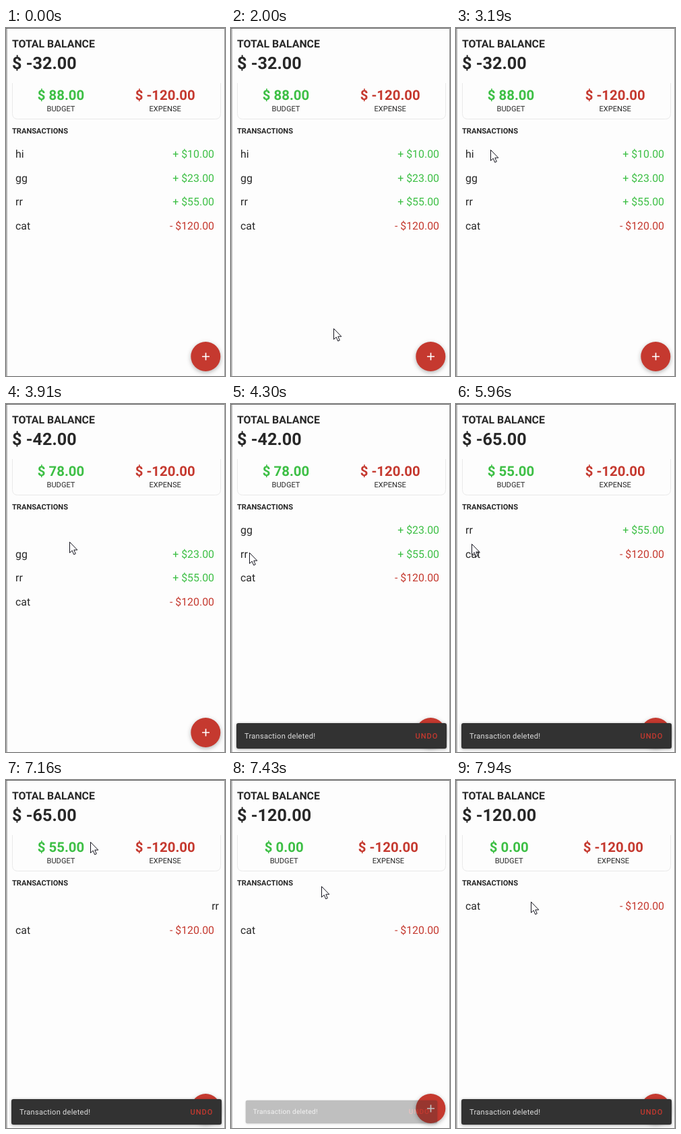
Animation of 325 by 518 pixels, one loop 8 s. Source, as an HTML page:

```html
<!DOCTYPE html>
<html lang="en">
<head>
<meta charset="utf-8">
<title>Budget list</title>
<style>
  html, body { margin: 0; width: 100%; height: 100%; overflow: hidden; background: #fdfdfd; }
  svg { display: block; width: 325px; height: 518px; font-family: Roboto, Arial, sans-serif; }
  text { fill: #282828; white-space: pre; text-rendering: geometricPrecision; }
  .bold { font-weight: 700; }
  .mid { text-anchor: middle; }
  .end { text-anchor: end; }
  .small { font-size: 11.1px; }
  .item { font-size: 15.9px; }
  .head { font-size: 15.9px; }
  .total { font-size: 25.2px; }
  .sum { font-size: 20.4px; }
  .green { fill: #3dbf45; }
  .red { fill: #c5392f; }
  .pale { fill: #dedede; }
  .fab { filter: drop-shadow(0 2px 3px rgba(0, 0, 0, .3)); }
  .bar { filter: drop-shadow(0 1px 2px rgba(0, 0, 0, .35)); }
</style>
</head>
<body>
<svg viewBox="0 0 325 518">
  <rect width="325" height="518" fill="#fdfdfd"/>
  <text class="bold head" x="9" y="29.4">TOTAL BALANCE</text>
  <text class="bold total" id="total" x="9" y="60.7"></text>

  <path d="M9.5 82V127.5Q9.5 135.5 17.5 135.5H310.5Q318.5 135.5 318.5 127.5V82"
        fill="none" stroke="#e9e9e9"/>
  <g id="sums">
    <text class="bold sum mid green" id="budget" x="81.5" y="106.7"></text>
    <text class="small mid" x="81.5" y="124.3">BUDGET</text>
    <text class="bold sum mid red" id="expense" x="236.2" y="106.7"></text>
    <text class="small mid" x="236.2" y="124.3">EXPENSE</text>
  </g>

  <text class="bold small" x="9" y="157.2">TRANSACTIONS</text>
  <g id="list"></g>

  <g class="fab">
    <circle cx="296.3" cy="489" r="22" fill="#c5392f"/>
    <path d="M291 489H302M296.5 483.5V494.5" stroke="#fff" stroke-width="1.7"/>
  </g>

  <g id="snack">
    <rect class="bar" x="8" y="475" width="312" height="38" rx="3" fill="#323232"/>
    <text class="small pale" x="20" y="497.7" letter-spacing=".25">Transaction deleted!</text>
    <text class="small red" x="273.5" y="497.8" letter-spacing="1" font-weight="500">UNDO</text>
  </g>

  <path d="M0 .5H325M1 0V518" stroke="#666"/>
  <path d="M324.5 0V518" stroke="#999"/>
  <path id="cursor" d="M.5 .5V16.5L4.2 13.1L6.7 19L9.3 17.9L6.8 12.2H11.8Z"
        fill="#fff" stroke="#15151f" stroke-linejoin="round"/>
</svg>
<script>
const LOOP = 8000, STEP = 130, FIRST_Y = 193, PITCH = 35.5;
const FADE_OUT = 75, FADE_IN = 150, MOVE_WAIT = 145, MOVE = 250;

// The screen refreshes in bursts; the pointer follows each path at an even pace.
const bursts = [
  { at: 120, steps: 8, path: [[289, 511], [259, 497], [276, 493]] },
  { at: 1580, steps: 4, path: [[245, 482], [152, 447]] },
  { at: 2410, steps: 8, path: [[145, 412], [123, 162], [22, 189]] },
  { at: 3490, steps: 8, path: [[30, 187], [118, 190], [34, 242], [22, 205]] },
  { at: 4620, steps: 8, path: [[30, 194], [116, 204], [16, 223]] },
  { at: 5720, steps: 8, path: [[24, 215], [20, 192], [64, 168]] },
  { at: 6770, steps: 10, path: [[80, 150], [125, 92], [138, 191], [111, 181]] }
];

const rows = [
  { name: "hi", value: 10, swipe: 3300, length: 500 },
  { name: "gg", value: 23, swipe: 4560, length: 500 },
  { name: "rr", value: 55, swipe: 6240, length: 1000 },
  { name: "cat", value: -120, swipe: Infinity, length: 0 }
];

const $ = id => document.getElementById(id);
const clamp = v => Math.max(0, Math.min(1, v));
const ease = v => (1 - Math.cos(Math.PI * clamp(v))) / 2;
const money = v => "$ " + v.toFixed(2);

function make(tag, parent, attrs, content = "") {
  const el = document.createElementNS("http://www.w3.org/2000/svg", tag);
  for (const name in attrs) el.setAttribute(name, attrs[name]);
  el.textContent = content;
  parent.append(el);
  return el;
}

for (const row of rows) {
  const [sign, color] = row.value < 0 ? ["-", "red"] : ["+", "green"];
  const amount = `${sign} $${Math.abs(row.value).toFixed(2)}`;
  row.gone = row.swipe + row.length + 60;
  row.el = make("g", $("list"));
  make("text", row.el, { class: "item", x: 14 }, row.name);
  make("text", row.el, { class: "item end " + color, x: 309 }, amount);
}

function along(path, u) {
  const pos = u * (path.length - 1);
  const i = Math.min(Math.floor(pos), path.length - 2);
  return path[i].map((v, k) => Math.round(v + (path[i + 1][k] - v) * (pos - i)));
}

function drawRows(t) {
  let y = FIRST_Y, budget = 0, expense = 0;
  for (const { el, value, swipe, length, gone } of rows) {
    const here = t < gone;
    const dx = t > swipe ? 344 * ((t - swipe) / length) ** 2 : 0;
    el.style.display = here ? "" : "none";
    el.setAttribute("transform", `translate(${dx} ${y})`);
    y += PITCH * (1 - ease((t - gone - MOVE_WAIT) / MOVE));
    if (here && value > 0) budget += value;
    if (here && value < 0) expense += value;
  }
  $("total").textContent = money(budget + expense);
  $("budget").textContent = money(budget);
  $("expense").textContent = money(expense);
  // A shorter amount shifts both columns.
  $("sums").setAttribute("transform", `translate(${budget < 10 ? -2.8 : 0})`);
}

function drawSnack(t) {
  const past = rows.filter(row => row.gone <= t);
  const age = past.length ? t - past[past.length - 1].gone : 0;
  const leaving = past.length > 1 && age < FADE_OUT;
  const shown = clamp((age - FADE_OUT) / FADE_IN);
  const scale = leaving ? 1 : 1 - 0.2 * (1 - shown) ** 2.3;
  $("snack").setAttribute("opacity", leaving ? 1 - age / FADE_OUT : shown);
  $("snack").setAttribute("transform", `translate(164 494) scale(${scale}) translate(-164 -494)`);
}

function draw(time) {
  const burst = bursts.filter(b => b.at <= time).pop();
  $("cursor").style.display = burst ? "" : "none";
  let t = 0;
  if (burst) {
    const last = burst.steps - 1;
    const i = Math.min(last, Math.floor((time - burst.at) / STEP));
    t = burst.at + i * STEP;
    $("cursor").setAttribute("transform", `translate(${along(burst.path, i / last)})`);
  }
  drawRows(t);
  drawSnack(t);
}

const start = performance.now();
function loop() {
  draw((performance.now() - start) % LOOP);
  requestAnimationFrame(loop);
}
loop();
</script>
</body>
</html>
```
